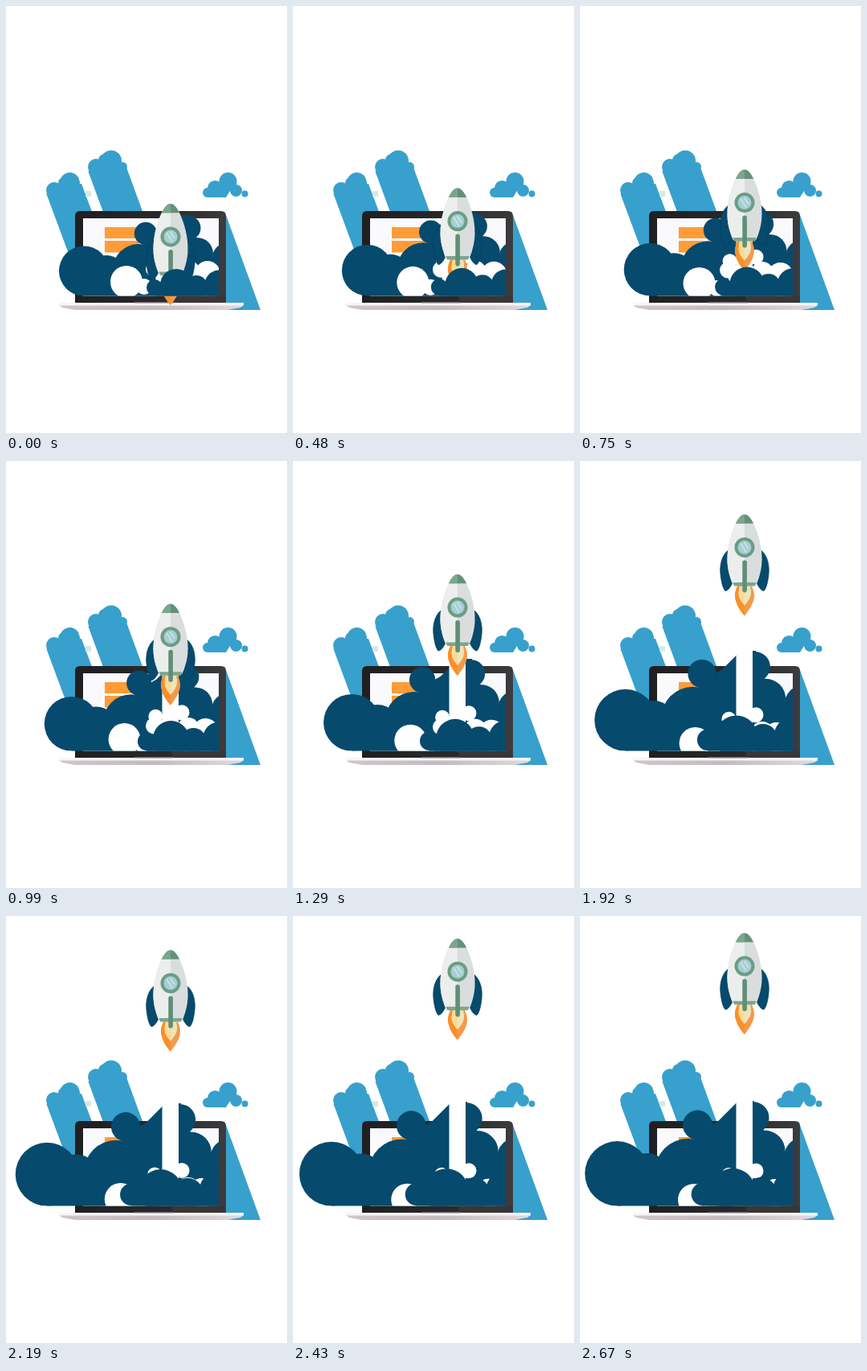
An HTML page that plays this animation: 350x531 px, repeating every 2700 ms.

```html
<!DOCTYPE html>
<html lang="en">
<head>
<meta charset="utf-8">
<title>Rocket launch</title>
<style>
  html, body { margin: 0; width: 100%; height: 100%; overflow: hidden; background: #fff; }
  svg { display: block; width: 350px; height: 531px; }
</style>
</head>
<body>
<svg viewBox="0 0 350 531">
  <defs>
    <clipPath id="deck"><path d="M-10 0H265V360.600H-10Z"/></clipPath>
    <clipPath id="leftHalf"><path d="M150 -5H205V140H150Z"/></clipPath>
    <linearGradient id="bezel">
      <stop offset="0" stop-color="#1f1f22"/>
      <stop offset=".6" stop-color="#29292c"/>
      <stop offset="1" stop-color="#3c3c3e"/>
    </linearGradient>
    <linearGradient id="base">
      <stop offset="0" stop-color="#cfc5cb"/>
      <stop offset=".5" stop-color="#c4babf"/>
      <stop offset="1" stop-color="#e0d9dd"/>
    </linearGradient>
    <path id="body" d="M205 0C210 0 214 7 216.500 12C223 27 226.500 41 226.500 56C226.500 68 223 79 219.500 87H190.500C187 79 183.500 68 183.500 56C183.500 41 187 27 193.500 12C196 7 200 0 205 0Z"/>
    <path id="nose" d="M205 0C210 0 213.500 6 216 11.300H194C196.500 6 200 0 205 0Z"/>
    <path id="flame" d="M196 89H214C217 96 218 101 216 107C214 114 211 118 205 126C199 119 196 114 194 107C192 101 193 96 196 89Z"/>
    <path id="core" d="M199 89H212C214 98 214 103 205 113C196 103 197 98 199 89Z"/>
    <path id="fin" d="M184 45C176 52 174 64 175 74C176 84 178 92 181 95C184 95 187 91 189.500 86C185 74 182 60 184 45Z"/>
  </defs>

  <g fill="#38a0cc">
    <path d="M50.500 234L104 378H153L94 221L60 222Z"/>
    <circle cx="60" cy="229" r="10"/>
    <circle cx="72" cy="220" r="7"/>
    <circle cx="79.500" cy="219" r="12"/>
    <circle cx="87" cy="220" r="5"/>
    <path d="M102.500 206L166 378H215L150.500 202L112 196Z"/>
    <circle cx="112" cy="200" r="10"/>
    <circle cx="123" cy="192" r="8"/>
    <circle cx="131" cy="192.500" r="13"/>
    <circle cx="145" cy="200" r="6"/>
    <path d="M250 378V260H274L317 378Z"/>
    <path d="M251 238H274L284 222L268 218L256 228Z"/>
    <circle cx="251" cy="232" r="6"/>
    <circle cx="260.500" cy="226.500" r="9.500"/>
    <circle cx="276.500" cy="218" r="11"/>
    <circle cx="286.500" cy="229.500" r="7.500"/>
    <circle cx="297.500" cy="233.500" r="4"/>
  </g>
  <rect x="99" y="230" width="7" height="7" fill="#d3ebe6"/>

  <path fill="url(#bezel)" d="M86 370V261Q86 255 92 255H268Q274 255 274 261V370Z"/>
  <path fill="#3a3638" d="M205 360H274V369H209Z"/>
  <rect x="96" y="264" width="169" height="96.600" fill="#fafafc"/>
  <path fill="#ff9c38" d="M123 275H166V289H123ZM123 292H166V306.500H123Z"/>
  <path fill="url(#base)" d="M66 372H296L292 375L276 378H86L70 375Z"/>
  <path fill="#f8f5f7" d="M66 369H296V372.500H66Z"/>
  <path fill="#bfb6bb" d="M160 368.500H209V370H160Z"/>

  <g clip-path="url(#deck)">
    <g id="back" fill="#064a6d">
      <path d="M97 361V335H125L163 305L180 287L194 279L213 260H228L240 296L266 322V361Z"/>
    </g>
    <g id="puffs" fill="#fff"></g>
  </g>
  <rect id="trail" x="194.500" width="20.500" fill="#fff"/>

  <g id="rocket">
    <use href="#flame" fill="#f39a4a"/>
    <use href="#flame" fill="#f98f2b" clip-path="url(#leftHalf)"/>
    <use href="#core" fill="#efe3b8"/>
    <use href="#core" fill="#f8dc98" clip-path="url(#leftHalf)"/>
    <g fill="#064a6d" stroke="#053f5e" stroke-width=".8">
      <use href="#fin"/>
      <use href="#fin" transform="matrix(-1 0 0 1 410 0)"/>
    </g>
    <use href="#body" fill="#d9dddd"/>
    <use href="#body" fill="#ebeeed" clip-path="url(#leftHalf)"/>
    <use href="#nose" fill="#64907a"/>
    <use href="#nose" fill="#7ba58f" clip-path="url(#leftHalf)"/>
    <path fill="#7ba58f" d="M190.500 84.500H219.500L218 89H192Z"/>
    <rect x="202.300" y="57" width="5.600" height="40" rx="2.800" fill="#5f8f78"/>
    <circle cx="205" cy="41" r="12.500" fill="#6d9c85"/>
    <circle cx="205" cy="41" r="8.500" fill="#a5cfd2"/>
    <path stroke="#c6e3e4" stroke-width="2" d="M200 36L207 47M204.500 34.500L210 43"/>
  </g>

  <g clip-path="url(#deck)" fill="#064a6d">
    <g id="front"><path d="M185 361V350H266V361Z"/></g>
  </g>
</svg>
<script>
const LOOP = 2700, STEP = 30;
const $ = id => document.getElementById(id);

function set(el, attrs) {
  for (const k in attrs) el.setAttribute(k, attrs[k]);
}

function addCircle(parent, cx, cy, r) {
  const c = document.createElementNS('http://www.w3.org/2000/svg', 'circle');
  set(c, { cx, cy, r });
  return parent.appendChild(c);
}

[[97, 329.5, 31], [125, 335, 25], [165, 328, 32], [174, 283, 14.2],
 [227.5, 276, 15], [238, 308, 20], [275, 313, 18]]
  .forEach(c => addCircle($('back'), ...c));

[[185, 350, 10], [212, 347, 20], [237, 349, 14], [198, 351, 9], [265, 346, 17.4]]
  .forEach(c => addCircle($('front'), ...c));

// x, y, radius, total drift in x and y
const puffs = [
  [150, 343, 20, -8, 10], [172, 349, 10, -8, 10], [184, 327, 10, 0, 8],
  [187, 316, 9, -2, 6], [219, 311, 9.5, 0, 6], [227, 330, 14, 0, 10],
  [251, 333, 16, -8, 10], [204, 336, 18, -6, 8]
].map(p => ({ p, el: addCircle($('puffs'), p[0], p[1], p[2]) }));

// Nearly a cosine ease, with a little constant speed mixed in
const ease = u => .9 * (1 - Math.cos(Math.PI * u)) / 2 + .1 * u;

const grow = s => `translate(266 360) scale(${s}) translate(-266 -360)`;

function draw(ms) {
  const t = Math.floor(ms % LOOP / STEP) * STEP;
  const k = ease(t / LOOP);
  const tip = 246 - 225 * k;

  set($('rocket'), { transform: `translate(0 ${tip})` });
  set($('trail'), { y: tip + 60, height: 270 - tip });
  set($('back'), { transform: grow(1 + .3 * k) });
  set($('front'), { transform: grow(1 + .4 * k) });
  for (const { p, el } of puffs) set(el, { cx: p[0] + p[3] * k, cy: p[1] + p[4] * k });
}

const start = performance.now();
function tick() {
  draw(performance.now() - start);
  requestAnimationFrame(tick);
}
draw(0);
requestAnimationFrame(tick);
</script>
</body>
</html>
```
